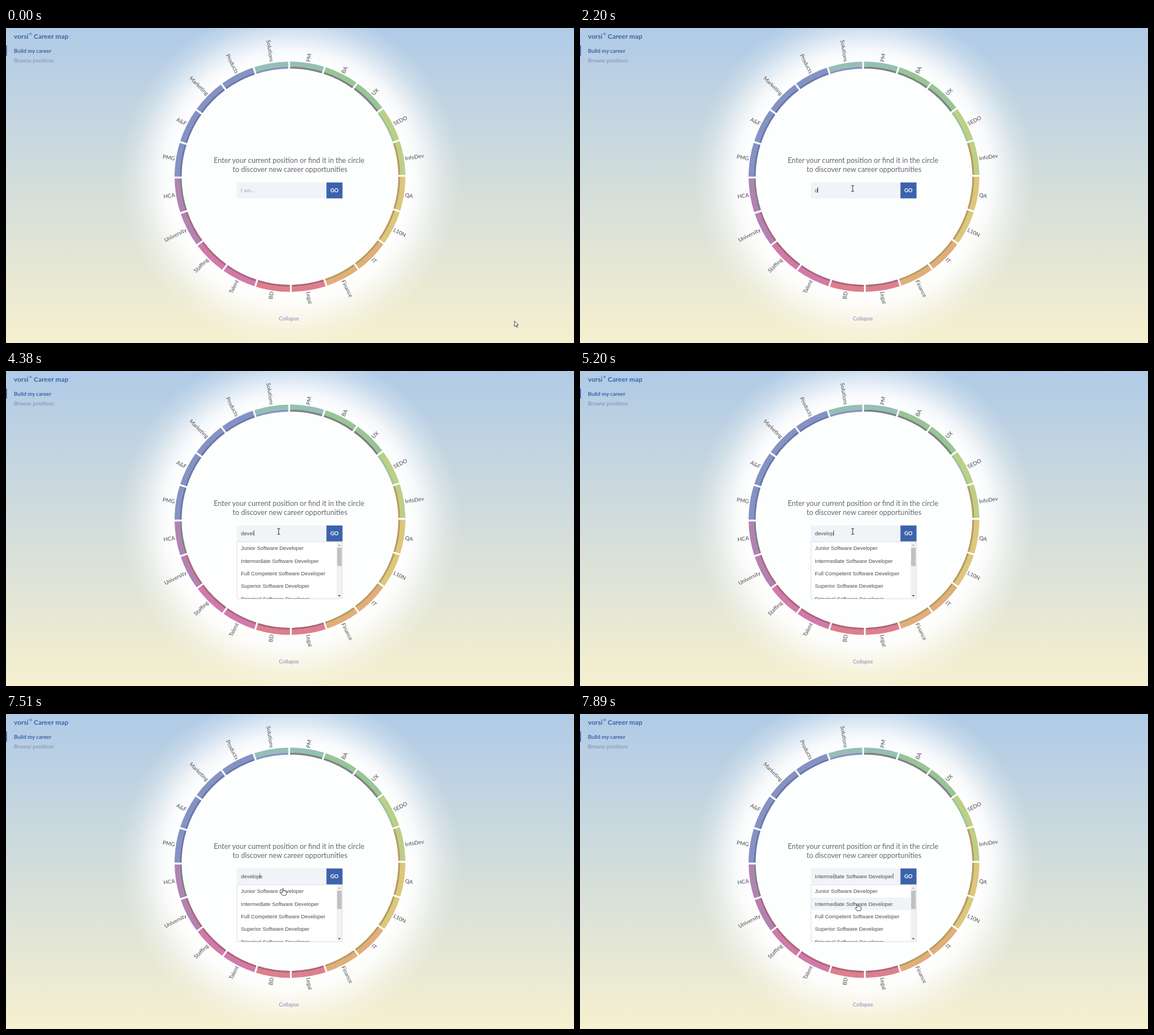
An HTML page for the animation above (8000 ms loop, 1004 px wide and 558 px high).

```html
<!DOCTYPE html>
<html lang="en">
<head>
<meta charset="utf-8">
<title>Career map</title>
<style>
html, body { margin: 0; width: 100%; height: 100%; overflow: hidden; }
svg { display: block; width: 100vw; height: 100vh; font: 9.6px Lato, sans-serif; }
.bold { font-weight: 700; fill: #3e62a8; }
.mid { text-anchor: middle; }
.lead { font-size: 12.65px; fill: #666771; }
.link { fill: #8c86b5; }
.form { font: 9.42px "Liberation Sans", Arial, sans-serif; fill: #4c4c4c; }
#labels { fill: #4a4b53; }
</style>
</head>
<body>
<svg viewBox="0 0 1004 558">
  <defs>
    <linearGradient id="sky" x2="0" y2="1">
      <stop stop-color="#b0cbe7"/><stop offset="1" stop-color="#f6f0cf"/>
    </linearGradient>
    <radialGradient id="halo" gradientUnits="userSpaceOnUse" cx="502" cy="263.4" r="302">
      <stop offset=".68" stop-color="#fff"/>
      <stop offset=".75" stop-color="#fff" stop-opacity=".86"/>
      <stop offset=".826" stop-color="#fff" stop-opacity=".55"/>
      <stop offset=".905" stop-color="#fff" stop-opacity=".24"/>
      <stop offset="1" stop-color="#fff" stop-opacity="0"/>
    </radialGradient>
    <clipPath id="listClip"><path d="M409 303H594V403.5H409Z"/></clipPath>
  </defs>
  <rect width="1004" height="558" fill="url(#sky)"/>
  <circle cx="502" cy="263.4" r="302" fill="url(#halo)"/>
  <circle cx="502" cy="263.4" r="204" fill="#fdfefe"/>

  <g class="bold">
    <text x="14" y="18.5" font-size="12">vorsi</text>
    <text x="41" y="12.5" font-size="6">®</text>
    <text x="49" y="18.5" font-size="12">Career map</text>
    <text x="14" y="43.5">Build my career</text>
  </g>
  <rect y="31" width="1.6" height="18" fill="#3c62ad"/>
  <text class="link" x="14" y="61" font-size="9.4">Browse positions</text>
  <text class="link mid" x="500" y="517.5">Collapse</text>

  <g id="ring" fill="none" transform="translate(502 263.4)"></g>
  <g id="labels" transform="translate(502 263.4)"></g>

  <text class="lead mid" x="500.3" y="239.4">Enter your current position or find it in the circle</text>
  <text class="lead mid" x="502" y="255.4">to discover new career opportunities</text>

  <path d="M408 273.6H566.4V301.8H408Z" fill="#f0f4f9"/>
  <path d="M566.4 273.6H594.8V301.8H566.4Z" fill="#3c62ad"/>
  <text class="mid" x="580.5" y="291.2" font-weight="700" fill="#fff">GO</text>
  <text id="hint" x="415" y="290.5" fill="#aaa9a6">I am...</text>
  <text id="entry" class="form" x="415.3" y="290.5"></text>
  <rect id="caret" y="282" width="1" height="10" fill="#666"/>
  <rect id="trace" x="448" y="282" width="1" height="10" fill="#888"/>

  <g id="list">
    <path d="M408.5 302.5H594.5V403.5H408.5Z" fill="#fff" stroke="#dcdee0"/>
    <rect id="hover" x="409" y="325" width="175.5" height="22.5" fill="#f0f4f9"/>
    <g id="rows" class="form" clip-path="url(#listClip)"></g>
    <path d="M584.5 303H594V403.5H584.5Z" fill="#f1f1f1"/>
    <path d="M585.3 313H593.3V345.5H585.3Z" fill="#c1c1c1"/>
    <path d="M587 309.5L589.2 307 591.4 309.5Z" fill="#a3a3a3"/>
    <path d="M586.8 397L589.2 399.6 591.6 397Z" fill="#444"/>
  </g>

  <g id="cursor" stroke-linejoin="round">
    <path id="arrow" fill="#fff" stroke="#333" stroke-width=".9"
      d="M0 0V10L2.4 7.8 4 11.3 5.6 10.6 4.1 7.2H7.1Z"/>
    <path id="beam" fill="none" stroke="#333" stroke-width="1.1"
      d="M-2.5-5H-.8L0-4.4 .8-5H2.5M0-4.4V4.4M-2.5 5H-.8L0 4.4 .8 5H2.5"/>
    <path id="hand" fill="#fff" stroke="#333" stroke-width=".9"
      d="M-1 8V1Q.1-.8 1.2 1V5Q2.3 4.2 3.3 5.4 4.5 4.8 5.2 6 6.6 5.8 6.6 7V9.5L5.3 12.8H-.5L-3.6 8.8Q-3.9 7-2.4 7.2Z"/>
  </g>
</svg>
<script>
const $ = id => document.getElementById(id);
const show = (id, on) => $(id).setAttribute('visibility', on ? 'visible' : 'hidden');

const GRAY = '#7f8183', TEAL = '#95bfb5', GREEN = '#98c596', LIME = '#bdcf86', GOLD = '#b79c5f',
  SAND = '#dcc77a', ORANGE = '#e2ae79', RED = '#dd7f8c', WINE = '#ad667a', PINK = '#d07aaa',
  PURPLE = '#b182b4', BLUE = '#8592c3', NAVY = '#6878ab';

// Clockwise from the top: label, band colour, inner edge colour
const sectors = [
  ['PM', TEAL, GRAY], ['BA', GREEN, GRAY], ['UX', GREEN, GRAY], ['SEDO', LIME, GREEN],
  ['InfoDev', LIME, GOLD], ['QA', SAND, GOLD], ['L10N', SAND, GOLD], ['IT', ORANGE, GOLD],
  ['Finance', ORANGE, GOLD], ['Legal', RED, WINE], ['BD', RED, WINE], ['Talent', PINK, WINE],
  ['Staffing', PINK, WINE], ['University', PURPLE, WINE], ['HCA', PURPLE, GRAY], ['PMG', BLUE, NAVY],
  ['A&amp;F', BLUE, NAVY], ['Marketing', BLUE, NAVY], ['Products', BLUE, NAVY], ['Solutions', TEAL, BLUE]
];

const point = (r, deg) => {
  const a = deg * Math.PI / 180;
  return (r * Math.sin(a)).toFixed(2) + ' ' + (-r * Math.cos(a)).toFixed(2);
};
const arc = (r, from, width, color) =>
  `<path d="M${point(r, from)}A${r} ${r} 0 0 1 ${point(r, from + 18)}" stroke="${color}" stroke-width="${width}"/>`;

let bands = '', gaps = '', labels = '';
sectors.forEach(([name, band, edge], i) => {
  const from = i * 18 - .43, mid = i * 18 + 9, left = mid > 180;
  bands += arc(199.4, from, 9.2, band) + arc(193.2, from, 3.4, edge);
  gaps += `<path d="M${point(190, from)}L${point(205.5, from)}" stroke="#fdfefe" stroke-width="3.2"/>`;
  labels += `<text transform="rotate(${mid + (left ? 90 : -90)})" x="${left ? -206 : 206}" dy=".35em"
    text-anchor="${left ? 'end' : 'start'}">${name}</text>`;
});
$('ring').innerHTML = bands + gaps;
$('labels').innerHTML = labels;
$('rows').innerHTML = ['Junior', 'Intermediate', 'Full Competent', 'Superior', 'Principal']
  .map((level, i) => `<text x="415.3" y="${317.2 + i * 22.4}">${level} Software Developer</text>`).join('');

const typed = [
  [0, ''], [2200, 'd'], [2670, 'de'], [3130, 'dev'], [3770, 'deve'], [4380, 'devel'],
  [4760, 'develo'], [5200, 'develop'], [6510, 'develope'], [7890, 'Intermediate Software Developer']
];
const moves = [
  [0, 'arrow', 898.7, 519], [70, 'arrow', 770, 425], [140, 'arrow', 610, 320],
  [220, 'arrow', 512, 270], [290, 'arrow', 484.5, 261.5],
  [430, 'beam', 484, 277], [510, 'beam', 483.3, 282.3], [580, 'beam', 482.5, 283.5], [660, 'beam', 482, 284.3],
  [7280, 'beam', 484, 289], [7360, 'beam', 487, 297], [7430, 'hand', 488.5, 304], [7510, 'hand', 489.3, 308.5],
  [7590, 'hand', 489.8, 317], [7660, 'hand', 490.2, 327], [7740, 'hand', 490.4, 333], [7820, 'hand', 490.4, 335.7]
];
const latest = (steps, t) => steps.filter(s => s[0] <= t).pop();

function draw(now) {
  const t = now % 8000;
  const [, shape, x, y] = latest(moves, t);
  $('cursor').setAttribute('transform', `translate(${x} ${y})`);
  for (const id of ['arrow', 'beam', 'hand']) show(id, id === shape);

  const text = latest(typed, t)[1];
  $('entry').textContent = text;
  $('caret').setAttribute('x', Math.round(415 + (text ? $('entry').getComputedTextLength() : 0)));
  show('caret', t >= 890 && (t < 7280 || t >= 7890));
  show('trace', t >= 6510);
  show('hint', !text);
  $('list').style.display = t >= 2500 ? '' : 'none';
  show('hover', t >= 7660);
  requestAnimationFrame(draw);
}
requestAnimationFrame(draw);
</script>
</body>
</html>
```
